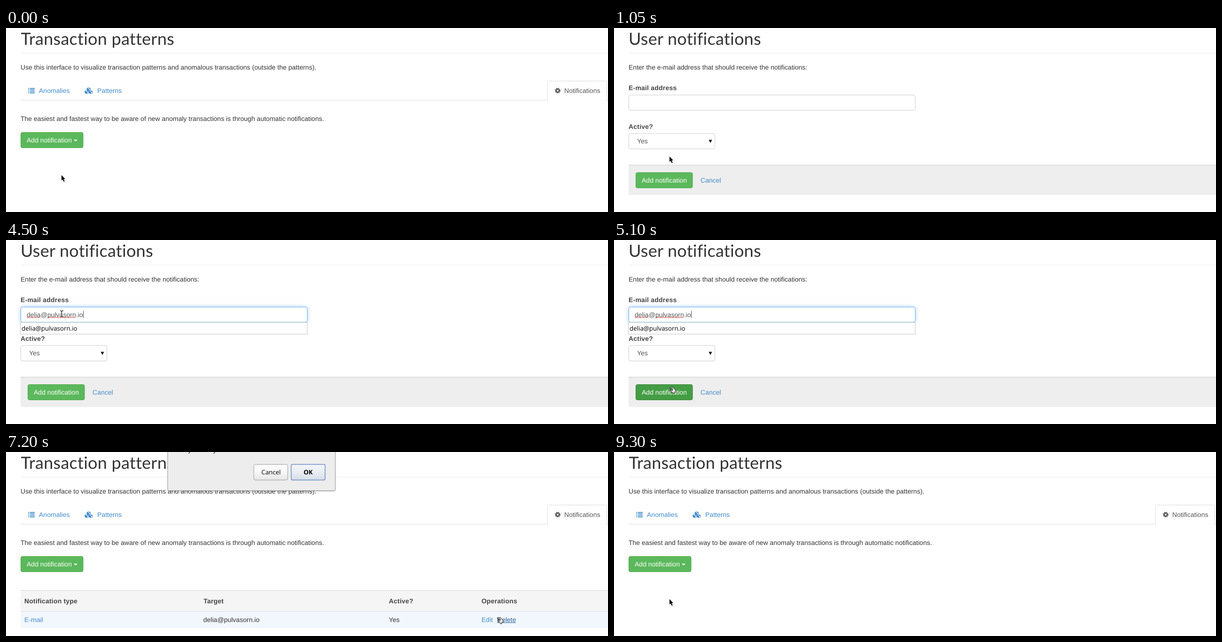
These frames come from a looping animation (1280x394 px, 9.45 s). An HTML page:

```html
<!DOCTYPE html>
<html lang="en">
<head>
<meta charset="utf-8">
<title>Notifications</title>
<style>
  html, body { margin: 0; width: 100%; height: 100%; overflow: hidden; background: #fff; }
  svg { display: block; width: 1280px; height: 394px; }
  text { font: 14px "Liberation Sans", Arial, sans-serif; fill: #333; letter-spacing: .015px; text-rendering: geometricPrecision; }
  .h1 { font: 36px Lato, sans-serif; letter-spacing: .25px; }
  .b { font-weight: bold; fill: #444; letter-spacing: .2px; }
  .link { fill: #428bca; }
  .grey { fill: #555; }
  .white { fill: #fff; }
  .ui { font: 13.33px "Open Sans", "Noto Sans", sans-serif; fill: #000; letter-spacing: 0; }
  .btn { fill: #5cb85c; stroke: #4cae4c; }
  .btn.hot { fill: #449d44; stroke: #398439; }
  .box { fill: #fff; stroke: #ccc; }
  .box.focus { stroke: #66afe9; filter: drop-shadow(0 0 4px rgba(102, 175, 233, .6)); }
  .del.hot { fill: #2a6496; }
  .hide { display: none; }
</style>
</head>
<body>
<svg viewBox="0 0 1280 394" xmlns="http://www.w3.org/2000/svg">
  <defs>
    <linearGradient id="plain" x2="0" y2="1">
      <stop offset="0" stop-color="#fdfdfd"/><stop offset=".5" stop-color="#f7f7f7"/><stop offset="1" stop-color="#e6e6e6"/>
    </linearGradient>
    <linearGradient id="blue" x2="0" y2="1">
      <stop offset="0" stop-color="#f3f5f8"/><stop offset=".5" stop-color="#e9edf3"/><stop offset="1" stop-color="#d6dde8"/>
    </linearGradient>
    <g id="cube">
      <path d="M0-4L4-2.2V2.2L0 4.2-4 2.2V-2.2Z" fill="#428bca"/>
      <path d="M0-2.9L2.4-1.9 0-.9-2.4-1.9ZM.7.5L3-.5V1.6L.7 2.7Z" fill="#fff"/>
    </g>
  </defs>
  <rect width="1280" height="394" fill="#fff"/>
  <path d="M32 53.5H1280" stroke="#eee"/>

  <g id="listPage">
    <text class="h1" x="31.5" y="36">Transaction patterns</text>
    <text x="31" y="89">Use this interface to visualize transaction patterns and anomalous transactions (outside the patterns).</text>
    <path d="M31 154.5H1151.5V117.500Q1151.5 113.5 1155.500 113.5H1273.500Q1277.5 113.5 1277.5 117.500V154.5H1280" fill="none" stroke="#ddd"/>
    <g stroke="#428bca" stroke-width="1.8">
      <path d="M47 129.500H49M47 132.700H49M47 135.900H49M47 139.100H49M50.500 129.500H61M50.500 132.700H61M50.500 135.900H61M50.500 139.100H61"/>
    </g>
    <use href="#cube" x="175.700" y="131"/>
    <use href="#cube" x="171.400" y="137"/>
    <use href="#cube" x="180" y="137"/>
    <text class="link" x="70" y="139">Anomalies</text>
    <text class="link" x="194" y="139">Patterns</text>
    <circle cx="1173" cy="134" r="4.5" fill="#555"/>
    <circle cx="1173" cy="134" r="4.9" fill="none" stroke="#555" stroke-width="2.400" stroke-dasharray="1.924"/>
    <circle cx="1173" cy="134" r="1.900" fill="#fff"/>
    <text class="grey" x="1187" y="139">Notifications</text>
    <text x="31" y="199">The easiest and fastest way to be aware of new anomaly transactions is through automatic notifications.</text>
    <rect id="openBtn" class="btn" x="31.5" y="223.5" width="132.500" height="33" rx="3.500"/>
    <text class="white" x="44" y="245">Add notification</text>
    <path d="M144 239H152L148 243Z" fill="#fff"/>

    <g id="menu">
      <rect x="31.5" y="259.5" width="159" height="37" rx="3.500" fill="#fff" stroke="#ccc"/>
      <rect id="item" x="32" y="265" width="158" height="26" fill="#f5f5f5"/>
      <text x="52" y="283">E-mail</text>
    </g>

    <g id="table">
      <rect x="31" y="297" width="1249" height="44" fill="#f5f5f5"/>
      <rect x="31" y="342" width="1249" height="35" fill="#f1f7fd"/>
      <path d="M31 296.5H1280M31 341.5H1280" stroke="#ddd"/>
      <text class="b" x="39" y="324">Notification type</text>
      <text class="b" x="420" y="324">Target</text>
      <text class="b" x="814" y="324">Active?</text>
      <text class="b" x="1011" y="324">Operations</text>
      <text class="link" x="39" y="364">E-mail</text>
      <text class="mail" x="419.500" y="364"></text>
      <text x="814" y="364">Yes</text>
      <text class="link" x="1011" y="364">Edit</text>
      <text id="del" class="link del" x="1044" y="364">Delete</text>
      <path id="delLine" d="M1044 365.5H1084" stroke="#2a6496"/>
    </g>

    <g id="dialog">
      <rect x="344" y="-9" width="356" height="91.500" rx="3" fill="#ededed" stroke="#aaa" style="filter:drop-shadow(0 1px 1px rgba(0,0,0,.35))"/>
      <text class="ui" x="363" y="0">Are you really sure?</text>
      <rect x="527" y="26.500" width="72" height="33.500" rx="3" fill="url(#plain)" stroke="#9a9a9a"/>
      <rect x="606.500" y="26.500" width="72" height="33.500" rx="3" fill="url(#blue)" stroke="#6d8cc0" stroke-width="1.500"/>
      <text class="ui" x="543" y="48">Cancel</text>
      <text class="ui" x="642.500" y="48" text-anchor="middle" style="font-weight:bold">OK</text>
    </g>
  </g>

  <g id="formPage">
    <text class="h1" x="31" y="36">User notifications</text>
    <text x="31" y="89">Enter the e-mail address that should receive the notifications:</text>
    <text class="b" x="31" y="133">E-mail address</text>
    <rect id="field" class="box" x="31.5" y="143.5" width="609" height="32.500" rx="3.500"/>
    <path id="waves" fill="none" stroke="#e22" stroke-width=".9"/>
    <text id="typed" class="grey" x="44" y="165"></text>
    <rect id="caret" y="152" width="1" height="15" fill="#444"/>
    <text class="b" x="31" y="216">Active?</text>
    <rect class="box" x="31.5" y="226" width="183" height="33" rx="3.500"/>
    <text class="grey" x="49" y="247">Yes</text>
    <path d="M201.500 239.500H208.500L205 246Z"/>
    <g id="hints">
      <rect x="30.5" y="176.5" width="610" height="25" fill="#fff" stroke="#c4c4c4"/>
      <text class="ui mail" x="33" y="194"></text>
    </g>
    <rect x="31" y="293" width="1249" height="64.500" fill="#eee"/>
    <path d="M31 293.5H1280" stroke="#ccc"/>
    <rect id="saveBtn" class="btn" x="46.500" y="309.5" width="120.500" height="33" rx="3.500"/>
    <text class="white" x="59" y="331">Add notification</text>
    <text class="link" x="184" y="331">Cancel</text>
  </g>

  <g id="arrow">
    <path d="M0-1V10.500L2.600 8.200 4.700 13.300 6.700 12.400 4.600 7.500H8Z" stroke="#fff" stroke-width="1.200" paint-order="stroke"/>
  </g>
  <g id="beam" fill="none">
    <path id="beamPath" d="M-3-6.500H-1L.5-5.500 2-6.500H4M.5-5.500V5.500M-3 6.500H-1L.5 5.500 2 6.500H4" stroke="#fff" stroke-width="2.600" stroke-opacity=".8"/>
    <path d="M-3-6.500H-1L.5-5.500 2-6.500H4M.5-5.500V5.500M-3 6.500H-1L.5 5.500 2 6.500H4" stroke="#000" stroke-width="1.200"/>
  </g>
  <g id="hand" stroke="#000" fill="#fff" stroke-linejoin="round">
    <path d="M1-.5H7.500L14.500 7.500 8.500 13.500 6.500 10.500H4.500L3.500 9.500 4 8.500 2.500 7.500 3 6 2 5 2.500 3.500H4.500L4 2H1L.5.700Z"/>
    <path d="M4 2H7.500M4.500 3.500H7.500L6.500 5.500H3M7 6L5.500 8H4M7.500 12L13 6.500" fill="none" stroke-width=".9"/>
  </g>
</svg>
<script>
  const STEP = 150, LOOP = 9450;
  const mail = "delia@pulvasorn.io", at = 5, dot = 15;
  const $ = id => document.getElementById(id);
  const show = (id, on) => $(id).classList.toggle("hide", !on);
  const mark = (id, name, on) => $(id).classList.toggle(name, on);
  const within = (k, a, b) => k >= a && k <= b;
  const ease = u => u * u * (3 - 2 * u);

  document.querySelectorAll(".mail").forEach(e => e.textContent = mail);

  const home = [118, 316], del = [1044, 355];
  const glide = (a, b, u) => a.map((v, i) => Math.round(v + (b[i] - v) * ease(u)));

  // Pointer place for each tick
  function pointer(k) {
    if (k < 1) return home;
    if (k < 9) return [118, [296, 250, 250, 264, 276][Math.min(k, 5) - 1]];
    if (k < 31) return [118, [236, 190, 158][Math.min(k, 11) - 9]];
    if (k < 35) return [118, [184, 234, 288, 316][k - 31]];
    if (k < 37) return home;
    if (k < 56) return glide(home, del, Math.min(1, (k - 36) / 7));
    return glide(del, home, (k - 55) / 7);
  }

  function shape(k) {
    if (within(k, 11, 30)) return "beam";
    const onLink = within(k, 2, 3) || within(k, 5, 6) || within(k, 34, 36) || within(k, 43, 55);
    return onLink ? "hand" : "arrow";
  }

  function wave(from, to) {
    let d = "M" + from + " 167";
    for (let x = from + 2, up = true; x <= to; x += 2, up = !up) d += "L" + x + " " + (up ? 165.2 : 167);
    return d;
  }

  function typeMail(n) {
    const el = $("typed");
    el.textContent = mail.slice(0, n);
    const width = m => m ? el.getSubStringLength(0, m) : 0;
    $("caret").setAttribute("x", Math.round(44 + width(n)));
    let d = "";
    if (n > at) d += wave(44, 44 + width(at));
    if (n > dot) d += wave(Math.round(44 + width(at + 1)), 44 + width(dot));
    $("waves").setAttribute("d", d);
  }

  function draw(t) {
    const k = Math.floor(t / STEP);
    const form = within(k, 7, 34);
    show("formPage", form);
    show("listPage", !form);

    mark("openBtn", "hot", within(k, 2, 6));
    show("menu", within(k, 3, 6));
    show("item", within(k, 5, 6));
    show("table", within(k, 35, 48));
    show("dialog", k === 48);
    mark("del", "hot", within(k, 43, 48));
    show("delLine", within(k, 43, 48));

    if (form) {
      const n = Math.max(0, Math.min(mail.length, k - 12));
      mark("field", "focus", k >= 12);
      show("caret", k >= 12);
      show("hints", n > 0);
      mark("saveBtn", "hot", k === 34);
      typeMail(n);
    }

    const kind = shape(k), [x, y] = pointer(k);
    for (const id of ["arrow", "beam", "hand"]) show(id, id === kind);
    $(kind).setAttribute("transform", `translate(${x} ${y})`);
  }

  function tick() {
    draw(performance.now() % LOOP);
    requestAnimationFrame(tick);
  }
  tick();
</script>
</body>
</html>
```
